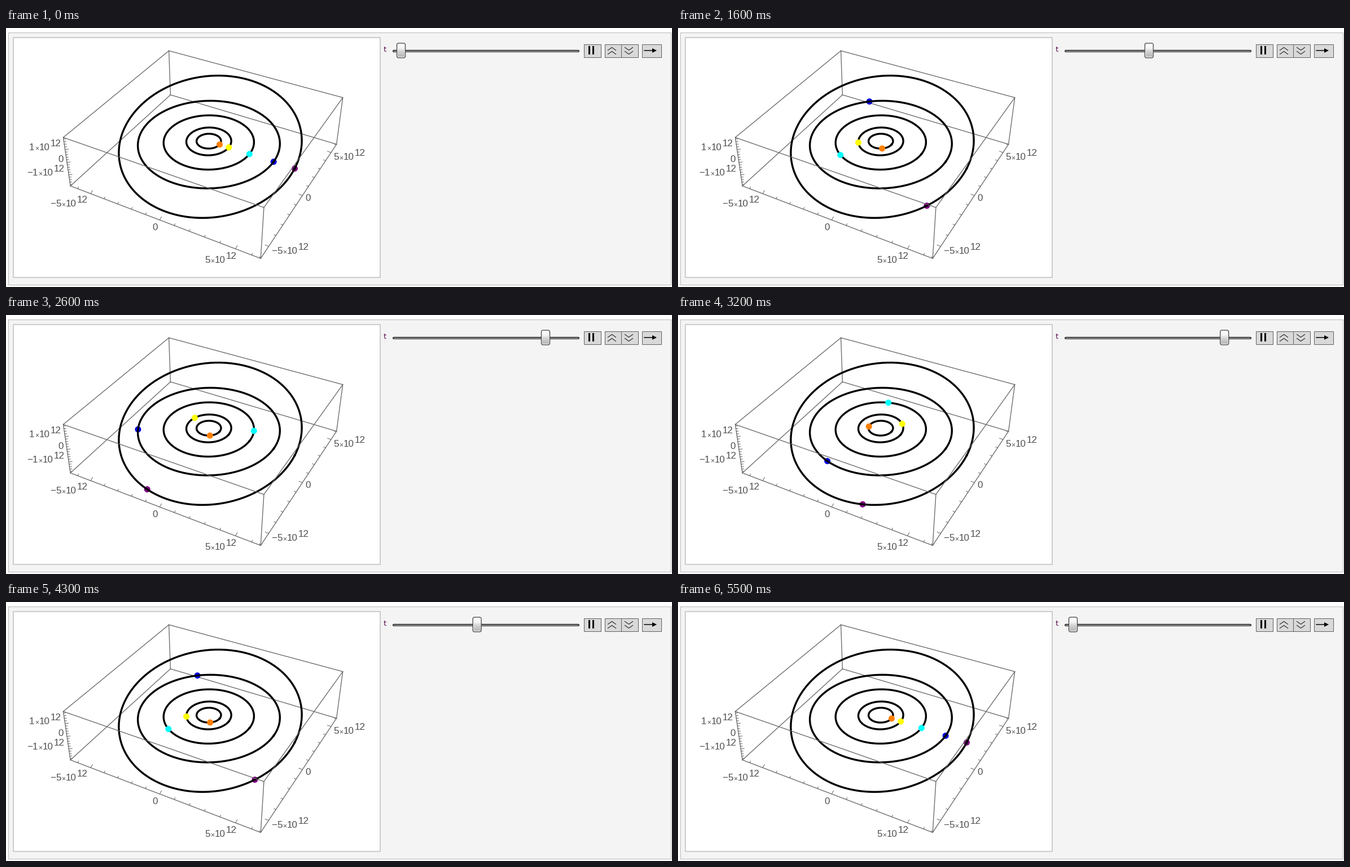
These frames come from a looping animation (1180 px wide and 460 px high, 6000 ms). A matplotlib script:

```python
import numpy as np
import matplotlib.pyplot as plt
from matplotlib.animation import FuncAnimation
from matplotlib.patches import Circle, FancyBboxPatch, Polygon, Rectangle

W, H, DPI = 1180, 460, 80
PX = 72 / DPI  # points per pixel
GRAY = "#666666"

fig = plt.figure(figsize=(W / DPI, H / DPI), dpi=DPI, facecolor="white")
ax = fig.add_axes([0, 0, 1, 1])
ax.set_xlim(0, W)
ax.set_ylim(H, 0)
ax.axis("off")

# Perspective camera for the box, whose axes each run from -1 to 1
CAMERA = np.array([
    [140.05, 115.65, -8.70, 358.8],
    [39.95, -68.05, -47.15, 200.3],
    [-0.0572, 0.0978, -0.0245, 1.0],
])
HALF = (6.56, 6.07, 1.92)  # half ranges in 1e12 m

# colour, extent along x, y and z, degrees per step, dot above its line
PLANETS = [
    ("#ff8000", 0.1187, 0.1284, 0.0092, 611.9, True),
    ("#ffff00", 0.2178, 0.2355, 0.032, 246.5, True),
    ("#00ffff", 0.4375, 0.475, 0.02, 86.4, True),
    ("#0000e0", 0.687, 0.741, 0.09, 44.05, False),
    ("#800080", 0.899, 0.898, 0.90, 29.25, False),
]


def project(x, y, z):
    u, v, w = CAMERA @ np.array([x, y, z, np.ones_like(x)], dtype=float)
    return u / w + 0.5, v / w + 0.5


def line(xs, ys, color=GRAY, width=1.0, z=2, **kw):
    ax.plot(xs, ys, color=color, lw=width * PX, zorder=z, **kw)


def rect(x0, y0, x1, y1, face, edge, width=1.0, z=0):
    ax.add_patch(Rectangle((x0 + 0.5, y0 + 0.5), x1 - x0, y1 - y0, fc=face,
                           ec=edge, lw=width * PX, zorder=z))


def text(x, y, s, size=17, color="#505050", font="Liberation Sans"):
    ax.text(x, y, s, size=size * PX, color=color, family=font,
            ha="left", va="baseline", zorder=8)


def power_label(x, y, digit, negative=False):
    if negative:
        text(x, y, "\u2212")
        x += 9.9
    text(x, y, digit)
    text(x + 10, y, "\u00d7", size=12)
    text(x + 17.5, y, "10")
    text(x + 38, y - 7, "12")


def orbit_point(planet, angle):
    _, p, q, s, *_ = planet
    return project(p * np.cos(angle), q * np.sin(angle), s * np.sin(angle))


def draw_box():
    corners = [(-1, -1), (1, -1), (1, 1), (-1, 1)]
    edges = []
    for (xa, ya), (xb, yb) in zip(corners, corners[1:] + corners[:1]):
        edges += [((xa, ya, z), (xb, yb, z)) for z in (-1, 1)]
        edges.append(((xa, ya, -1), (xa, ya, 1)))
    back = (-1, 1, -1)
    for a, b in edges:
        u, v = project(*np.array([a, b]).T)
        line(u, v, width=1.3, z=2 if back in (a, b) else 6)


def tick(point, dx, dy):
    u, v = project(*point)
    line([u, u + dx], [v, v + dy], z=6)


def draw_ticks():
    for n in range(-6, 7):
        k = 1.0 if n % 5 == 0 else 0.55
        tick((n / HALF[0], -1, -1), 3.2 * k, -5.6 * k)
        tick((1, n / HALF[1], -1), -6.2 * k, -2.4 * k)
    for n in range(-9, 10):
        k = 1.0 if n % 5 == 0 else 0.6
        tick((-1, -1, n * 0.2 / HALF[2]), 6 * k, -0.6 * k)


def draw_labels():
    power_label(78, 317, "5", True)
    text(259, 359, "0")
    power_label(352, 417, "5")
    power_label(470, 401, "5", True)
    text(530, 307, "0")
    power_label(580, 234, "5")
    power_label(41, 217, "1")
    text(92, 238, "0")
    power_label(37, 262, "1", True)


def draw_controls():
    text(668.5, 42, "t", size=13, color="#5a0a46", font="DejaVu Sans")
    line([686.5, 1013.5], [40.5, 40.5], "#404040", 4.4, 7,
         solid_capstyle="round")
    line([687, 1013], [40.5, 40.5], "#a0a0a0", 1.4, 7,
         solid_capstyle="round")
    for x0, x1 in ((1023, 1053), (1060, 1089), (1089, 1119), (1126, 1160)):
        rect(x0, 28, x1, 51, "#d9d9d9", "#606060", z=7)
    for x in (1032, 1039):
        ax.add_patch(Rectangle((x, 32), 3, 15, fc="black", lw=0, zorder=8))
    for x, d in ((1073.5, -1), (1103.5, 1)):
        for y in (37, 44):
            line([x - 7, x, x + 7], [y - 2.5 * d, y + 2.5 * d, y - 2.5 * d],
                 "#202020", 1.1, 8)
    line([1131, 1147], [40, 40], "black", 1.5, 8)
    ax.add_patch(Polygon([(1145, 36), (1153, 40), (1145, 44)], fc="black",
                         lw=0, zorder=8))


rect(3, 7, 1177, 455, "#f4f4f4", "#b8b8b8")
rect(12.5, 16.5, 662, 442.5, "white", "#c2c2c2", 1.6, 1)
draw_box()
draw_ticks()
draw_labels()
draw_controls()

turn = np.linspace(0, 2 * np.pi, 200)
dots = []
for planet in PLANETS:
    line(*orbit_point(planet, turn), "black", 3.4, 4)
    dot = Circle((0, 0), 5.5, fc=planet[0], lw=0,
                 zorder=5 if planet[-1] else 3)
    dots.append(ax.add_patch(dot))

thumb = ax.add_patch(FancyBboxPatch(
    (0, 0), 9, 20, boxstyle="round,pad=3,rounding_size=3",
    fc="#f0f0f0", ec="#484848", lw=1.3 * PX, zorder=9))
shade = np.interp(np.linspace(0, 1, 24), [0, 0.35, 0.55, 1],
                  [1.0, 0.95, 0.84, 0.72])
shine = ax.imshow(shade[:, None], cmap="gray", vmin=0, vmax=1, aspect="auto",
                  extent=(0, 1, 1, 0), interpolation="bilinear", zorder=10)


def clock(i):
    """Steps elapsed: rest, run forward, run back, rest."""
    k = min(max(i - 4, 0), 25, max(55 - i, 0))
    return max(k - 0.912, 0.0)


def update(i):
    t = clock(i)
    for planet, dot in zip(PLANETS, dots):
        dot.center = orbit_point(planet, np.radians(planet[4] * t))
    x = 700 + 12.14 * t
    thumb.set_x(x - 4.5)
    thumb.set_y(30)
    shine.set_extent((x - 6, x + 6, 51.5, 28.5))
    ax.set_xlim(0, W)
    ax.set_ylim(H, 0)
    return [*dots, thumb, shine]


anim = FuncAnimation(fig, update, frames=60, interval=100, repeat=True,
                     repeat_delay=0, blit=False)
plt.show()
```
